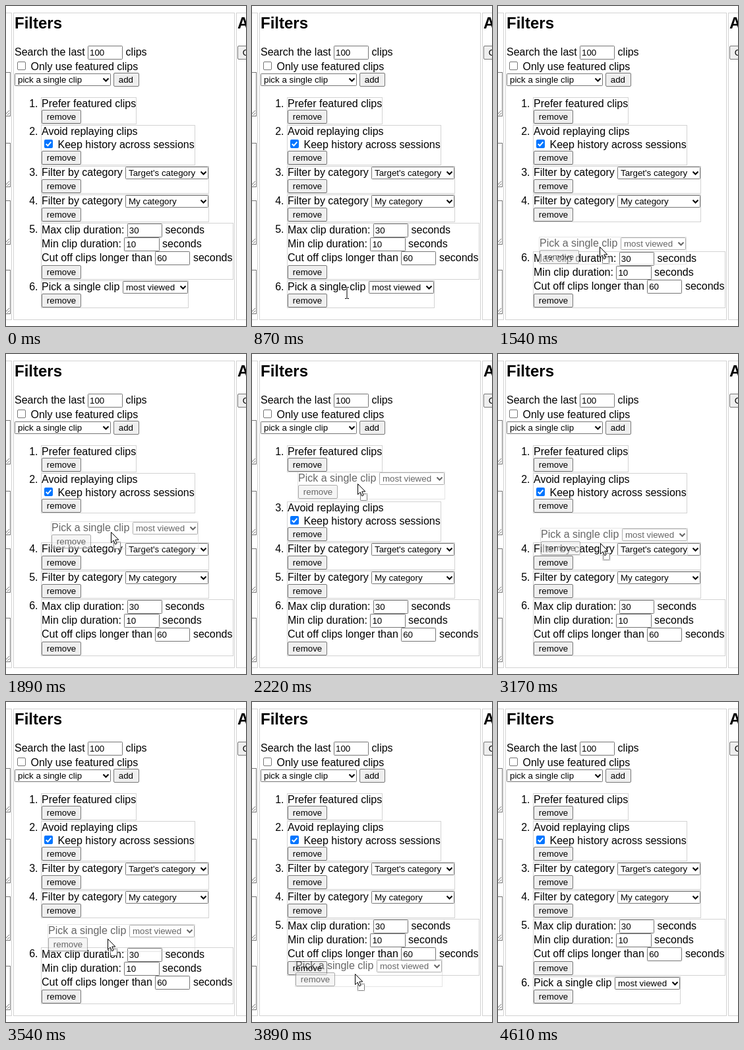
Write an HTML page that moves like this. It is 364 px wide and 484 px high and loops after 5.32 s.

```html
<!DOCTYPE html>
<html lang="en">
<head>
<meta charset="utf-8">
<title>Filter list sorting</title>
<style>
  html, body { margin: 0; width: 100%; height: 100%; overflow: hidden; background: #fff; }
  svg { display: block; width: 100%; height: 100%; }
  text { font: 16px "Liberation Sans", Arial, sans-serif; white-space: pre; }
  text.control { font-size: 13.333px; }
  text.heading { font-size: 24px; font-weight: bold; }
  .frame { fill: none; stroke: #d3d3d3; }
  .field { fill: #fff; stroke: #767676; }
  .button { fill: #efefef; stroke: #767676; }
  .chevron { fill: none; stroke: #000; stroke-width: 2; }
  .grip { fill: none; stroke: #767676; }
  .checked { fill: #0075ff; }
  .tick { fill: none; stroke: #fff; stroke-width: 2; }
  .pointer { fill: #fff; stroke: #000; }
  .caret { fill: none; stroke: #000; }
</style>
</head>
<body>
<svg id="stage" viewBox="0 0 364 484"></svg>
<script>
const LOOP = 5320;
const ENTER = 620, DRAG = 1240, TURN = 2550, DROP = 4230, LEAVE = 4360, GONE = 4610;
const LIST_TOP = 138, DRAGGED = 5;
const DRAG_LAG = 15, SORT_LAG = 50;
const stage = document.getElementById('stage');

// Drawing helpers; boxes are given by their outer pixel edges
const box = (cls, x, y, w, h, r = 0) =>
  `<rect class="${cls}" x="${x + .5}" y="${y + .5}" width="${w - 1}" height="${h - 1}" rx="${r}"/>`;
const label = (x, y, str, cls = '') => `<text class="${cls}" x="${x}" y="${y}">${str}</text>`;
const button = (x, y, w, str) =>
  box('button', x, y, w, 21, 1.5) + label(x + 7.8, y + 15, str, 'control');
const remove = y => button(54, y, 60, 'remove');
const numberField = (x, y, str) => {
  const left = Math.round(x), right = Math.round(x + 53.2);
  return box('field', left, y, right - left, 21, .8) + label(x + 3, y + 15, str, 'control');
};
const select = (x, y, w, str) =>
  box('field', x, y, w, 19, .8) + label(x + 5, y + 14, str, 'control') +
  `<path class="chevron" d="M${x + w - 11.5} ${y + 7.5}l4 4l4 -4"/>`;
const checkbox = (x, y, on) => on
  ? `<rect class="checked" x="${x}" y="${y}" width="13" height="13" rx="2"/>` +
    `<path class="tick" d="M${x + 2.7} ${y + 6.6}l2.7 2.7l5 -5.7"/>`
  : box('field', x, y, 13, 13, 1.5);
const textarea = y =>
  box('field', -40, y, 47, 67) + `<path class="grip" d="M-2 ${y + 65}l7 -7M2 ${y + 65}l3 -3"/>`;
const column = (x, w) => box('frame', x, 10, w, 465);
const duration = (y, str, x, value) =>
  label(54, y + 15, str) + numberField(x, y, value) + label(x + 57.7, y + 15, 'seconds');
const category = value =>
  label(54, 15, 'Filter by category') + select(181, 1, 126, value) + remove(20);

const items = [
  { h: 42, w: 145, body: label(54, 15, 'Prefer featured clips') + remove(19) },
  { h: 62, w: 234, body: label(54, 15, 'Avoid replaying clips') + checkbox(58, 22, true) +
      label(78.5, 35, 'Keep history across sessions') + remove(39) },
  { h: 43, w: 255, body: category("Target's category") },
  { h: 43, w: 255, body: category('My category') },
  { h: 87, w: 292, body: duration(1, 'Max clip duration:', 183.8, '30') +
      duration(22, 'Min clip duration:', 179.4, '10') +
      duration(43, 'Cut off clips longer than', 226.2, '60') + remove(64) },
  { h: 43, w: 224, body: label(54, 15, 'Pick a single clip') +
      select(177, 1, 99, 'most viewed') + remove(20) }
];

const page =
  column(-40, 49) + column(11, 336) + column(349, 60) +
  [100, 207, 294, 399].map(textarea).join('') +
  label(13, 34, 'Filters', 'heading') + label(351, 34, 'A', 'heading') +
  button(351, 60, 60, 'C') +
  label(13, 75, 'Search the last') + numberField(124, 60, '100') + label(181.6, 75, 'clips') +
  checkbox(17, 84, false) + label(37.5, 97, 'Only use featured clips') +
  select(13, 102, 146, 'pick a single clip') + button(163, 101, 39, 'add');

const list = items.map(({ w, h, body }) =>
  `<g class="item">${label(35.2, 15, '', 'marker')}${box('frame', 53, 0, w, h - 1)}${body}</g>`).join('');

const cursor = `<g id="cursor">
  <rect id="dropBox" class="pointer" x="4.5" y="15.5" width="10" height="10"
    stroke-dasharray="1 1" stroke-dashoffset=".5"/>
  <path id="arrow" class="pointer" d="M.5 .5V16.5L4.2 13L6.7 18.7L9.2 17.6L6.8 12H11.8Z"/>
  <path id="beam" class="caret" d="M-3 -8.5H-.5M.5 -8.5H3M0 -8V8M-3 8.5H-.5M.5 8.5H3"/>
</g>`;

stage.innerHTML = page + list + cursor;
const nodes = [...stage.querySelectorAll('.item')];
const markers = [...stage.querySelectorAll('.marker')];
const [pointer, dropBox, arrow, beam] =
  ['cursor', 'dropBox', 'arrow', 'beam'].map(id => document.getElementById(id));

const progress = (t, from, to) => Math.min(1, Math.max(0, (t - from) / (to - from)));
const glide = u => (5 * u - u ** 5) / 4;

// The pointer's way is the sum of four hand movements
function cursorAt(t) {
  const enter = progress(t, ENTER, 870), up = progress(t, 1290, 2470);
  const down = progress(t, 2620, 4140), leave = progress(t, LEAVE, GONE);
  return {
    x: 144 + 6 * (1 - enter) - 14 * Math.sin(Math.PI * enter) + 16 * (1 - (1 - up) ** 4)
      - 6 * Math.sin(Math.PI * down) - 13 * down ** 16 + 79 * leave,
    y: 434 + 48 * (1 - enter) - 262 * glide(up) + 253 * glide(down) + 61 * leave ** 2
  };
}

// An item swaps with the dragged one as soon as the pointer reaches its near edge
function slotAt(t) {
  const { y } = cursorAt(t - SORT_LAG);
  let top = LIST_TOP;
  return items.slice(0, DRAGGED).filter(({ h }) => {
    const edge = top + (t < TURN ? h : items[DRAGGED].h);
    top += h;
    return edge <= y;
  }).length;
}

const move = (node, x, y) => node.setAttribute('transform', `translate(${Math.round(x)} ${Math.round(y)})`);
const show = (node, on) => node.setAttribute('visibility', on ? 'visible' : 'hidden');

function render(t) {
  const { x, y } = cursorAt(t);
  const dragging = t >= DRAG && t < DROP;
  const order = [...items.keys()].slice(0, DRAGGED);
  order.splice(slotAt(t), 0, DRAGGED);

  let top = LIST_TOP;
  order.forEach((id, slot) => {
    move(nodes[id], 0, top);
    markers[id].textContent = `${slot + 1}.`;
    top += items[id].h;
  });
  show(markers[DRAGGED], !dragging);
  nodes[DRAGGED].setAttribute('opacity', dragging ? .6 : 1);
  if (dragging) {
    const held = cursorAt(t - DRAG_LAG);
    move(nodes[DRAGGED], held.x - 144, held.y - 20);
  }

  const visible = t >= ENTER && t < GONE;
  const overText = !dragging && y < 437;
  move(pointer, x, y);
  show(dropBox, dragging);
  show(arrow, visible && !overText);
  show(beam, visible && overText);
}

const start = performance.now();
function tick() {
  render((performance.now() - start) % LOOP);
  requestAnimationFrame(tick);
}
tick();
</script>
</body>
</html>
```
